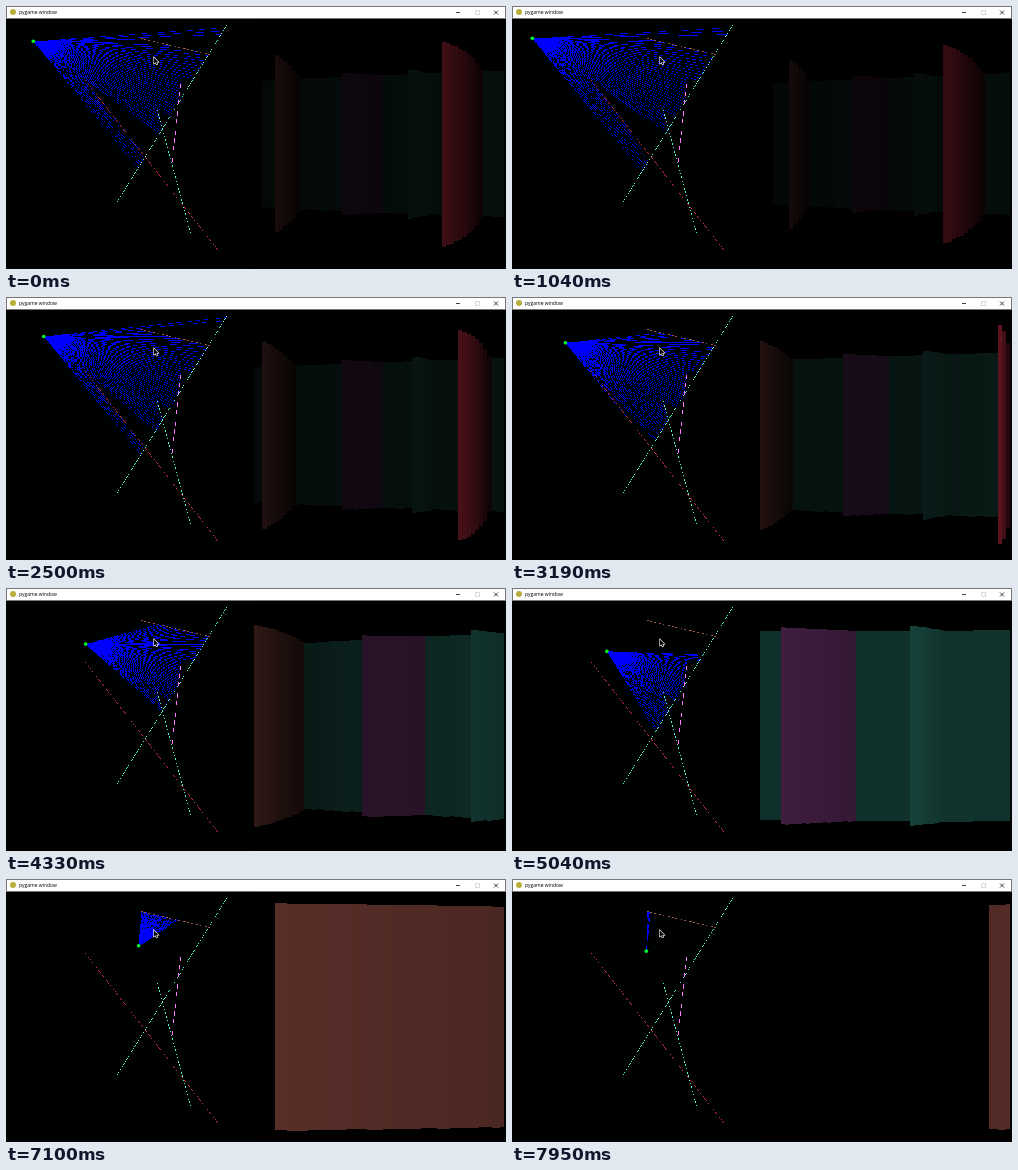
These frames come from a looping animation (500 px wide and 263 px high, 8000 ms). An HTML page with a canvas:

```html
<!DOCTYPE html>
<html lang="en">
<head>
<meta charset="utf-8">
<title>pygame window</title>
<style>
  html, body { margin: 0; width: 100%; height: 100%; overflow: hidden; background: #000; }
  canvas { position: absolute; left: 0; top: 0; }
  .bar { position: absolute; left: 0; top: 0; width: 500px; height: 13px; box-sizing: border-box; background: #fff; border: 1px solid #777; }
  .icon { position: absolute; left: 3px; top: 2px; width: 6px; height: 6px; border-radius: 50%; background: #b9ad3c; }
  .title { position: absolute; left: 12px; top: 1px; font: 5px/9px "Open Sans", sans-serif; color: #000; white-space: nowrap; }
  .bar svg { position: absolute; left: 449px; top: 2px; }
</style>
</head>
<body>
<canvas id="stage" width="500" height="263"></canvas>
<div class="bar">
  <div class="icon"></div>
  <div class="title">pygame window</div>
  <svg width="46" height="7" fill="none" stroke="#111" stroke-width=".8">
    <path d="M0 3.5h4M38 1.5l4 4m0-4l-4 4"/>
    <path d="M19.5 1.5h4v4h-4z" stroke="#ccc"/>
  </svg>
</div>
<script>
const ctx = document.getElementById('stage').getContext('2d');
const LOOP = 8000, START = 490, TICK = 76.75;
const SCALE = 2.4;                  // window pixels per stage pixel
const RAYS = 60, FOV = 1;
const SPEED = 1.88, TURN = 4.6;     // pixels and degrees per tick
const VIEW = { x: 248, w: 250, mid: 138, h: 250 };

const teal = [82, 245, 215], brown = [162, 84, 74];
const pink = [255, 120, 255], red = [208, 46, 70];

// x1, y1, x2, y2, colour
const walls = [
  [220, 19, 111, 195, teal],
  [135, 32, 203, 48, brown],
  [174.5, 72, 165.5, 157, pink],
  [151, 104, 184, 226, teal],
  [79, 74, 211, 243, red]
];

// Spans of ticks during which each key is held
const keys = {
  back: [[0, 3], [7, 12], [95, 98]],
  ahead: [[13, 82]],
  left: [[49, 51], [67, 98]],
  right: [[52, 55.7]]
};

// Share of tick i for which a key is down
const held = (key, i) => keys[key].reduce(
  (sum, [from, to]) => sum + Math.max(0, Math.min(to, i + 1) - Math.max(from, i)), 0);

function pose(ticks) {
  let x = 27, y = 35, heading = 22.2;
  for (let i = 0; i < ticks; i++) {
    heading += TURN * (held('right', i) - held('left', i));
    const step = SPEED * (held('ahead', i) - held('back', i));
    const a = heading * Math.PI / 180;
    x += step * Math.cos(a);
    y += step * Math.sin(a);
  }
  return { x, y, angle: heading * Math.PI / 180 };
}

function cast(x, y, angle) {
  const dx = Math.cos(angle), dy = Math.sin(angle);
  let best = null;
  for (const [x1, y1, x2, y2, color] of walls) {
    const ex = x2 - x1, ey = y2 - y1;
    const det = dx * ey - dy * ex;
    if (!det) continue;
    const d = ((x1 - x) * ey - (y1 - y) * ex) / det;
    const u = ((x1 - x) * dy - (y1 - y) * dx) / det;
    if (d > 0 && u >= 0 && u <= 1 && (!best || d < best.d)) {
      best = { d, color, x: x + dx * d, y: y + dy * d };
    }
  }
  return best;
}

// Stage pixel that samples window pixel p, or -1 if it is skipped
function sample(p) {
  const s = Math.floor(p / SCALE);
  return Math.floor((s + 0.5) * SCALE) === p ? s : -1;
}

// Hard line, one window pixel wide, shrunk by nearest neighbour
function thinLine(...ends) {
  const [x1, y1, x2, y2] = ends.map(v => Math.floor((v + 0.5) * SCALE));
  const n = Math.max(Math.abs(x2 - x1), Math.abs(y2 - y1)) || 1;
  for (let i = 0; i <= n; i++) {
    const sx = sample(Math.round(x1 + (x2 - x1) * i / n));
    const sy = sample(Math.round(y1 + (y2 - y1) * i / n));
    if (sx >= 0 && sy >= 0) ctx.fillRect(sx, sy, 1, 1);
  }
}

const rgb = (color, k) => `rgb(${color.map(c => Math.round(c * k))})`;

function drawColumn(i, depth, color) {
  const h = VIEW.h - 0.715 * depth;
  if (h <= 0) return;
  const left = Math.round(VIEW.x + i * VIEW.w / RAYS);
  const right = Math.round(VIEW.x + (i + 1) * VIEW.w / RAYS);
  ctx.fillStyle = rgb(color, Math.exp(-0.019 * depth));
  ctx.fillRect(left, Math.round(VIEW.mid - h / 2), right - left, Math.round(h));
}

const pointer = new Path2D('M148 51.5v6l1.4-1.2 1 2.2 1-.5-1-2.1h1.8z');

function draw(ticks) {
  const { x, y, angle } = pose(ticks);
  ctx.fillStyle = '#000202';
  ctx.fillRect(0, 0, 500, 263);
  ctx.fillStyle = '#000';
  ctx.fillRect(VIEW.x, 13, VIEW.w, 250);

  for (let i = 0; i < RAYS; i++) {
    const off = ((i + 0.5) / RAYS - 0.5) * FOV;
    const hit = cast(x, y, angle + off);
    if (!hit) continue;
    ctx.fillStyle = '#00f';
    thinLine(x, y, hit.x, hit.y);
    drawColumn(i, hit.d * Math.cos(off), hit.color);
  }

  for (const [x1, y1, x2, y2, color] of walls) {
    ctx.fillStyle = rgb(color, 1);
    thinLine(x1, y1, x2, y2);
  }

  ctx.fillStyle = '#0f2';
  ctx.beginPath();
  ctx.arc(x + 0.3, y + 0.2, 1.8, 0, 7);
  ctx.fill();

  ctx.strokeStyle = '#fff';
  ctx.lineWidth = 1.2;
  ctx.stroke(pointer);
  ctx.fillStyle = '#000';
  ctx.fill(pointer);
}

const origin = performance.now();
let shown = -1;
function loop() {
  const t = (performance.now() - origin) % LOOP;
  const ticks = Math.max(0, Math.floor((t - START) / TICK) + 1);
  if (ticks !== shown) draw(shown = ticks);
  requestAnimationFrame(loop);
}
loop();
</script>
</body>
</html>
```
